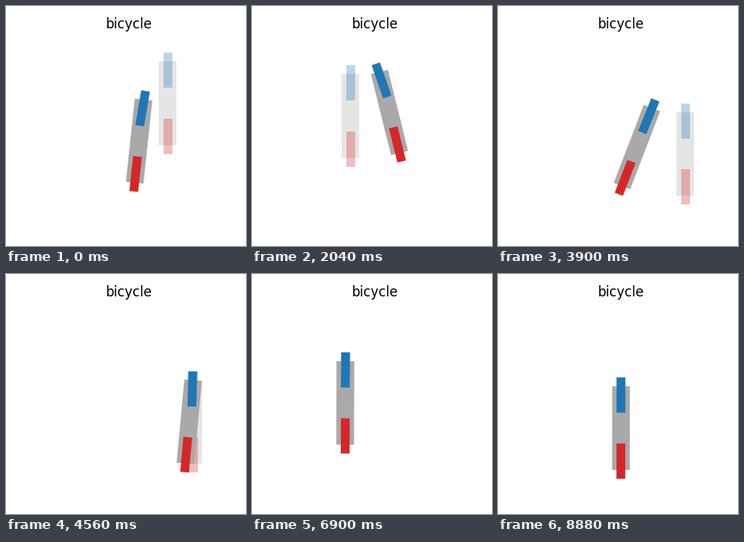
Recreate the animation shown at these times as a matplotlib script. Size 300 by 300 pixels, loop 9000 ms.

```python
import numpy as np
import matplotlib.pyplot as plt
from matplotlib.animation import FuncAnimation
from matplotlib.patches import Polygon

FRAMES = 150
HOLD = 30            # frames per goal
CRUISE = 24.0        # forward speed of the moving view, px per frame
BASE = 82.5          # distance between the axles
WHEEL = (44, 11)
BODY = (104.5, 22)
COLORS = ("darkgray", "tab:red", "tab:blue")

START = (153.75, 151.4)
# goal of the front axle, then rate and delay of the sideways and lengthwise moves
GOALS = [
    (202.4, 80.0, 0.36, 0.99, 0.55, 1.30),
    (123.3, 96.2, 0.278, 3.85, 0.55, 1.45),
    (234.4, 143.7, 0.26, 3.98, 0.60, 1.75),
    (116.2, 119.8, 0.34, 2.83, 0.60, 5.80),
    (153.75, 151.4, 0.27, 4.10, 0.60, 4.70),
]


def sigmoid(u):
    return 1 / (1 + np.exp(-u))


def track(t):
    """Sideways place of the rear axle, lengthwise place of the front one."""
    x, y = START
    px, py = START
    for i, (gx, gy, rx, cx, ry, cy) in enumerate(GOALS):
        s = t - HOLD * i
        x += (gx - px) * sigmoid(rx * (s - cx)) ** 2
        y += (gy - py) * sigmoid(ry * (s - cy))
        px, py = gx, gy
    return np.array([x, y])


def motion(t, h=0.02):
    """Heading and speed over ground."""
    vx, vy = (track(t + h) - track(t - h)) / (2 * h)
    ahead = CRUISE - vy
    return np.arctan2(vx, ahead), np.hypot(vx, ahead)


def pose(t, h=0.05):
    x, fy = track(t)
    head, speed = motion(t)
    turn = (motion(t + h)[0] - motion(t - h)[0]) / (2 * h)
    steer = np.arctan(BASE * turn / speed)
    rear = np.array([x, fy + BASE * np.cos(head)])
    return rear, head, steer


def box(center, size, angle):
    along = np.array([np.sin(angle), -np.cos(angle)]) * size[0] / 2
    side = np.array([np.cos(angle), np.sin(angle)]) * size[1] / 2
    return np.array([center + along + side, center + along - side,
                     center - along - side, center - along + side])


def outlines(rear, head, steer):
    axis = np.array([np.sin(head), -np.cos(head)]) * BASE
    return (box(rear + axis / 2, BODY, head),
            box(rear, WHEEL, head),
            box(rear + axis, WHEEL, head + steer))


fig = plt.figure(figsize=(3, 3), dpi=100)
ax = fig.add_axes([0.125, 0.11, 0.775, 0.77])
ax.set_xlim(37.5, 270)
ax.set_ylim(267, 36)
ax.axis("off")
ax.set_title("bicycle", fontsize=12, family="DejaVu Sans")


def make_bike(alpha, z):
    parts = [Polygon(np.zeros((4, 2)), closed=True, facecolor=c,
                     edgecolor="none", alpha=alpha, zorder=z + k)
             for k, c in enumerate(COLORS)]
    for p in parts:
        ax.add_patch(p)
    return parts


def place(parts, *state):
    for part, pts in zip(parts, outlines(*state)):
        part.set_xy(pts)


ghost = make_bike(0.3, 1)
bike = make_bike(1.0, 5)


def draw(i):
    gx, gy = GOALS[i // HOLD][:2]
    place(ghost, np.array([gx, gy + BASE]), 0.0, 0.0)
    place(bike, *pose(min(i, FRAMES - 2)))
    return ghost + bike


anim = FuncAnimation(fig, draw, frames=FRAMES, interval=60,
                     repeat=True, repeat_delay=0)
plt.show()
```
